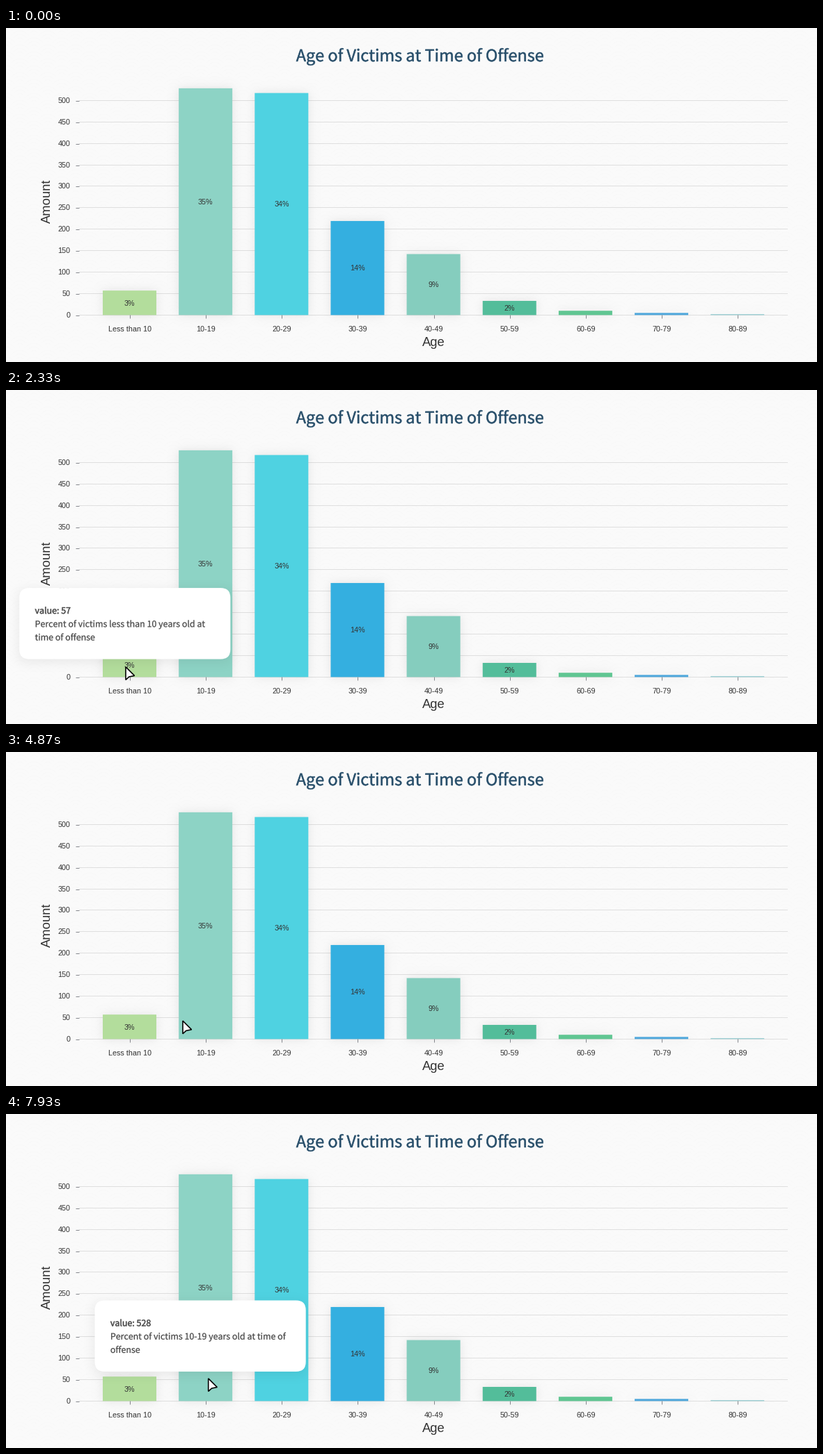
Animation, 1165 px wide and 481 px high, one loop 8 s. Source, as a matplotlib script:

```python
import math

import matplotlib.pyplot as plt
import numpy as np
from matplotlib.animation import FuncAnimation
from matplotlib.patches import FancyBboxPatch, Polygon, Rectangle
from matplotlib.patheffects import Stroke

W, H, DPI = 1165, 481, 64
PT = 72 / DPI                      # points per pixel
FRAMES, INTERVAL = 200, 40
SANS, HUMANIST = "Liberation Sans", "Noto Sans CJK JP"
INK, TICK = "#333333", "#85878d"

VALUES = [57, 528, 517, 219, 142, 33, 10, 5, 2]
TOTAL = 1508
COLORS = ["#b3dd9c", "#8dd3c5", "#4fd2e1", "#34afe0", "#85cdbe",
          "#53bd9a", "#60c692", "#50a8dc", "#92cbd0"]
BASE, UNIT = 413, 0.6185           # baseline row, pixels per value
BAR_W, BAR_STEP, FIRST = 77, 109.15, 177.5

TIPS = [("value: 57", "Percent of victims less than 10 years old at",
         "time of offense"),
        ("value: 528", "Percent of victims 10-19 years old at time of",
         "offense")]
TIP_W, TIP_H, PAD = 303.2, 102.5, 30

# Resting points, joined by three sweeps; time runs in steps of 1/15 s.
POINTER = np.array([(134, 431), (171, 397), (269.5, 383), (295, 378)])
CARD = np.array([(-18, 293), (19.5, 285), (118.5, 269.6), (145, 266.2)])
POINTER_MIDS = np.array([24, 69.8, 118])
CARD_MIDS = POINTER_MIDS + (4, 0, 1.5)
SPANS = np.array([3, 4, 1.5])
ENTER, SWITCH = 21, 73
ARROW = np.array([(1, 1.8), (1, 20.4), (5.8, 16), (13.6, 14.4)])


def sweep(points, mids, k):
    """S-shaped moves from each point to the next."""
    done = (1 + np.tanh((k - mids) / SPANS)) / 2
    return points[0] + done @ np.diff(points, axis=0)


def card_alpha(k):
    first = min(k - 25, 72 - k)
    return float(np.clip(max(first, k - SWITCH) / 3, 0, 1))


def soft_box(xs, ys, x0, y0, x1, y1, sigma):
    """Blurred rectangle, 0 to 1."""
    erf = np.vectorize(math.erf)
    s = sigma * math.sqrt(2)
    span = lambda v, a, b: (erf((v - a) / s) - erf((v - b) / s)) / 2
    return np.outer(span(ys, y0, y1), span(xs, x0, x1))


def scallops(radius=20, rise=10, ring=5):
    """Faint overlapping arcs."""
    y, x = np.mgrid[0:H, 0:W] + 0.5
    img = np.full((H, W), 0.98)
    for j in range(-1, (H + radius) // rise + 2):
        dx = (x + (j % 2) * radius) % (2 * radius) - radius
        d = np.hypot(dx, y - j * rise)
        tone = np.where(d % ring < 1.2, 0.975, 0.981)
        img = np.where(d < radius, tone, img)
    return img


def row(v):
    return round(BASE - v * UNIT)


def bars():
    """Centre, top and bottom of each bar."""
    for i, v in enumerate(VALUES):
        bottom = BASE + 0.4
        yield FIRST + i * BAR_STEP, bottom - v * UNIT, bottom


def backdrop():
    img = scallops()
    for v in range(0, 501, 50):
        img[row(v), 105:1123] = 0.875
    xs, ys = np.arange(W) + 0.5, np.arange(H) + 0.5
    for x, top, bottom in bars():
        img *= 1 - 0.09 * soft_box(xs, ys, x - BAR_W / 2, top,
                                   x + BAR_W / 2, bottom, 7)
    return np.repeat(img[:, :, None], 3, axis=2)


def text(x, y, s, px, color=INK, font=SANS, bold=0, **kw):
    t = ax.text(x, y, s, fontsize=px * PT, color=color, family=font,
                **{"ha": "center", "va": "baseline", **kw})
    if bold:
        t.set_path_effects([Stroke(linewidth=bold * PT, foreground=color)])
    return t


def picture(img, extent, **kw):
    return ax.imshow(img, extent=extent, aspect="auto", **kw)


fig = plt.figure(figsize=(W / DPI, H / DPI), dpi=DPI, facecolor="#fafafa")
ax = fig.add_axes([0, 0, 1, 1])
ax.axis("off")

picture(backdrop(), (0, W, H, 0), interpolation="nearest", zorder=0)
text(595, 48, "Age of Victims at Time of Offense", 23.4, "#264d69",
     HUMANIST, bold=0.5)
text(614, 457.5, "Age", 18.4)
text(64, 249.5, "Amount", 18.4, rotation=90, rotation_mode="anchor")

for v in range(0, 501, 50):
    ax.hlines(row(v) + 0.5, 100, 105, color=TICK, lw=PT)
    text(92.5, row(v) + 4, str(v), 10.7, ha="right")

for i, (x, top, bottom) in enumerate(bars()):
    share = 100 * VALUES[i] // TOTAL
    ax.add_patch(Rectangle((x - BAR_W / 2, top), BAR_W, bottom - top,
                           fc=COLORS[i], lw=0, snap=False, zorder=2))
    ax.vlines(math.floor(x) + 0.5, BASE, BASE + 5, color=TICK, lw=PT)
    text(x + 0.5, 437, f"{10 * i}-{10 * i + 9}" if i else "Less than 10", 10.7)
    if share:
        text(x, (top + bottom) / 2 + 3.8, f"{share}%", 10.7, zorder=3)

# Tooltip and pointer
sx, sy = np.arange(TIP_W + 2 * PAD) + 0.5, np.arange(TIP_H + 2 * PAD) + 0.5
glow = np.zeros((len(sy), len(sx), 4))
glow[..., 3] = 0.08 * soft_box(sx, sy, PAD, PAD, PAD + TIP_W, PAD + TIP_H, 9)
shadow = picture(glow, (0, 1, 1, 0), interpolation="bilinear", zorder=5)
card = ax.add_patch(FancyBboxPatch(
    (0, 0), TIP_W, TIP_H, boxstyle="round,pad=0,rounding_size=14",
    fc="white", lw=0, zorder=6))
lines = [text(0, 0, "", 12.42, "#464646", HUMANIST, bold=b, ha="left",
              zorder=7) for b in (0.5, 0.25, 0.25)]
arrow = ax.add_patch(Polygon(ARROW, fc="white", ec="black", lw=1.6 * PT,
                             joinstyle="miter", zorder=9))
ax.set_xlim(0, W)
ax.set_ylim(H, 0)


def update(i):
    k = (INTERVAL * i + 30) * 3 // 200
    left, top = sweep(CARD, CARD_MIDS, k)
    alpha = card_alpha(k)
    for part in (shadow, card, *lines):
        part.set_visible(alpha > 0)
        part.set_alpha(alpha)
    card.set_bounds(left, top, TIP_W, TIP_H)
    sl, st = left - PAD, top + 4 - PAD
    shadow.set_extent((sl, sl + len(sx), st + len(sy), st))
    for n, (line, s) in enumerate(zip(lines, TIPS[k >= SWITCH])):
        line.set_text(s)
        line.set_position((left + 22.4, top + 37 + 19.25 * n))
    arrow.set_visible(k >= ENTER)
    arrow.set_xy(ARROW + sweep(POINTER, POINTER_MIDS, k))
    return [shadow, card, *lines, arrow]


anim = FuncAnimation(fig, update, frames=FRAMES, interval=INTERVAL,
                     repeat=True, repeat_delay=0, blit=False)
plt.show()
```
